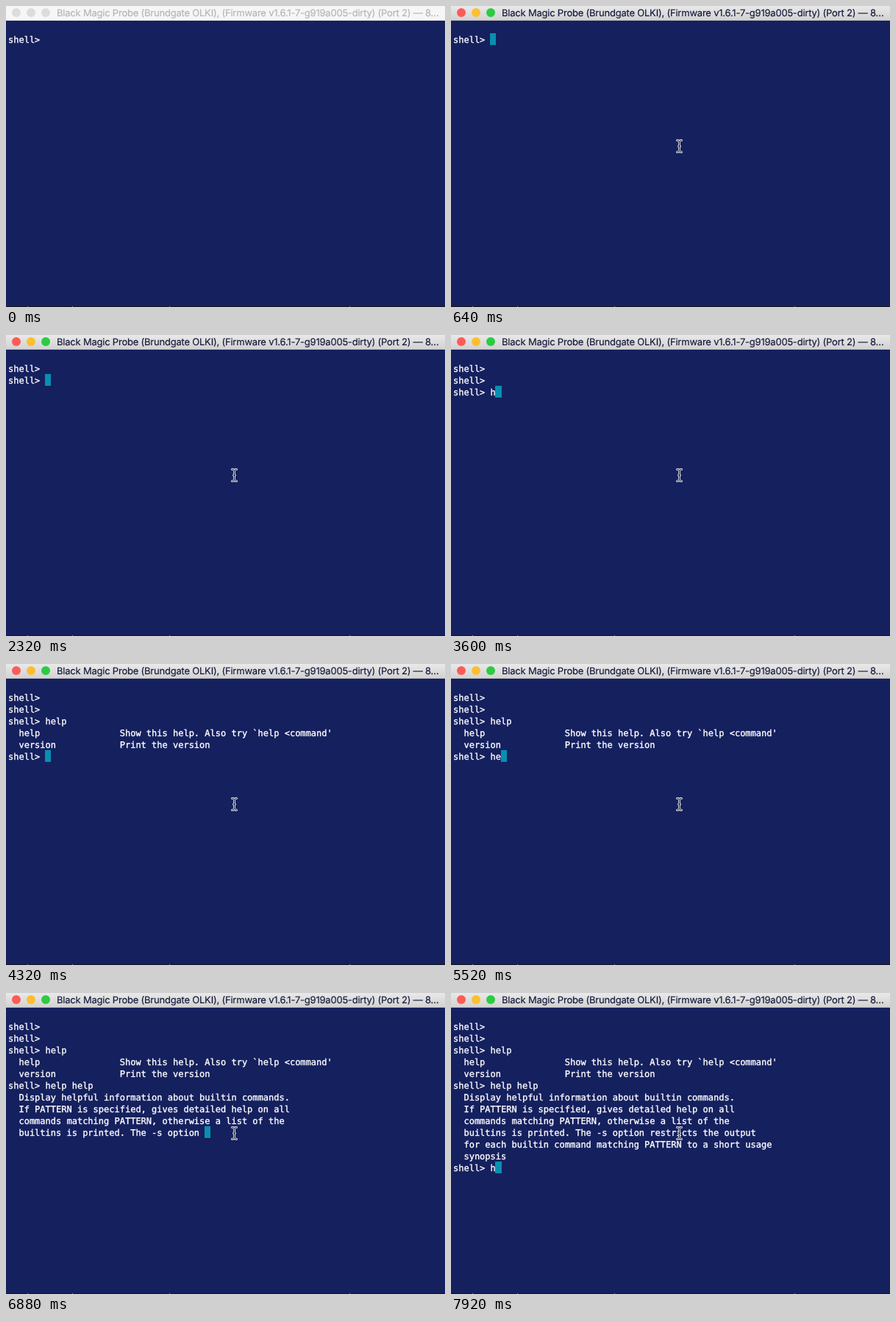
These frames come from a looping animation (597x409 px, 8000 ms). An HTML page:

```html
<!DOCTYPE html>
<html lang="en">
<head>
<meta charset="utf-8">
<title>Serial shell</title>
<style>
html, body { margin: 0; width: 100%; height: 100%; overflow: hidden; background: #15205e; }
#stage { position: relative; width: 597px; height: 409px; overflow: hidden; text-rendering: geometricPrecision; }
#stage > * { position: absolute; }
#bar { left: 0; top: 0; width: 597px; height: 20px; box-sizing: border-box;
  background: #f6f6f6; border-bottom: 1px solid #dadada; color: #b4b4b4;
  font: 13px/20px Inter, Roboto, sans-serif; letter-spacing: -.215px; white-space: pre; }
#bar.on { background: linear-gradient(#e9e9e9, #d2d2d2); border-color: #b4b4b4; color: #14183a; }
#bar span { position: absolute; left: 69px; top: 0; -webkit-text-stroke: .15px; }
#bar i { position: absolute; top: 3px; width: 12px; height: 12px; border-radius: 50%; background: #dcdcdc; }
#bar.on i { background: var(--c); }
#text { margin: 0; left: 3px; top: 38px; color: #fff; -webkit-text-stroke: .35px;
  font: 12px/16px "DejaVu Sans Mono", "Liberation Mono", monospace; }
#block { height: 16px; background: #088fb0; }
#edge { left: 0; top: 408px; width: 597px; height: 1px; background: #14151c; }
#edge::after { content: ""; position: absolute; left: 29px; width: 1px; height: 1px; color: #9a9ca4;
  background: currentColor; box-shadow: 61px 0, 193px 0, 438px 0; }
#mouse { left: 0; top: 0; fill: none; stroke-linecap: round; }
</style>
</head>
<body>
<div id="stage">
  <div id="bar"><i style="left:8px;--c:#fc5b57"></i><i style="left:28px;--c:#fdbe30"></i><i style="left:48px;--c:#2bcb42"></i><span>Black Magic Probe (Brundgate OLKI), (Firmware v1.6.1-7-g919a005-dirty) (Port 2) — 8…</span></div>
  <div id="block"></div>
  <pre id="text"></pre>
  <div id="edge"></div>
  <svg id="mouse" width="12" height="22">
    <defs><path id="beam" d="M2.5 3.5Q5.5 3.5 5.5 6V17Q5.5 19.5 2.5 19.5M8.5 3.5Q5.5 3.5 5.5 6M5.5 17Q5.5 19.5 8.5 19.5M4.5 11.5H6.5"/></defs>
    <use href="#beam" stroke="#d6d8dc" stroke-width="3"/>
    <use href="#beam" stroke="#20263f"/>
  </svg>
</div>
<script>
const LOOP = 8000, STEP = 80, CELL = 7.224, FOCUS = 640;
const PROMPT = 'shell> ';
const list = `
  ${'help'.padEnd(19)}Show this help. Also try \`help <command'
  ${'version'.padEnd(19)}Print the version
${PROMPT}`;
const usage = `
  Display helpful information about builtin commands.
  If PATTERN is specified, gives detailed help on all
  commands matching PATTERN, otherwise a list of the
  builtins is printed. The -s option restricts the output
  for each builtin command matching PATTERN to a short usage
  synopsis
${PROMPT}`;

// [time, text]: keys appear at once, long replies stream at serial speed
const events = [
  [0, PROMPT], [2320, '\n' + PROMPT], [2800, '\n' + PROMPT],
  [3600, 'h'], [3760, 'e'], [4000, 'lp'], [4240, list],
  [5360, 'h'], [5520, 'e'], [5600, 'l'], [5680, 'p'], [5840, ' '],
  [6080, 'h'], [6160, 'e'], [6320, 'l'], [6400, 'p'], [6720, usage],
  [7920, 'h'],
];

const el = id => document.getElementById(id);
const [bar, text, block, mouse] = ['bar', 'text', 'block', 'mouse'].map(el);

function screenAt(t) {
  let s = '';
  for (const [at, part] of events)
    if (t >= at) s += part.slice(0, 45 + (t - at) / STEP * 77);
  return s;
}

function cursorOn(t) {
  if (t < FOCUS) return false;
  return t >= 2240 || Math.floor((t - 320) / 480) % 2 === 0;
}

function draw(now) {
  const t = Math.floor(now % LOOP / STEP) * STEP;
  const s = screenAt(t), lines = s.split('\n');
  if (text.textContent !== s) text.textContent = s;

  const col = lines[lines.length - 1].length;
  const left = Math.floor(3 + col * CELL), right = Math.ceil(3 + (col + 1) * CELL);
  block.style.left = left + 'px';
  block.style.width = right - left + 'px';
  block.style.top = 37 + (lines.length - 1) * 16 + 'px';
  block.hidden = !cursorOn(t);

  bar.className = t >= FOCUS ? 'on' : '';

  // the pointer glides in from below the window
  const away = (1 - Math.min(1, Math.max(0, (t - 320) / 320))) ** 2;
  mouse.style.transform = `translate(${305 + Math.round(20 * away)}px, ${179 + Math.round(230 * away)}px)`;
  requestAnimationFrame(() => draw(performance.now() - start));
}
const start = performance.now();
draw(0);
</script>
</body>
</html>
```
